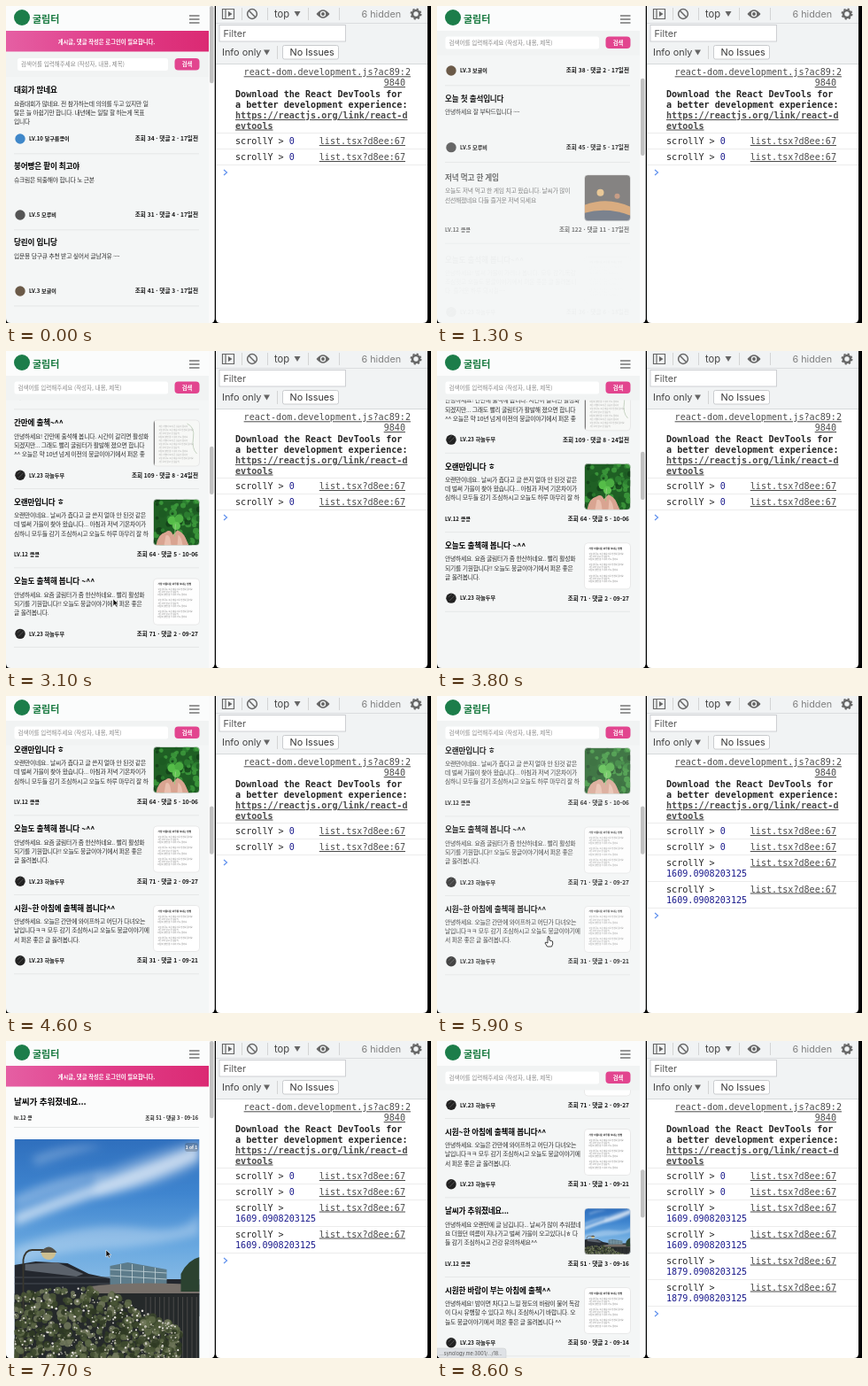
Animation, 480 px wide and 358 px high, one loop 8.9 s. Source, as an HTML page:

```html
<!DOCTYPE html>
<html lang="ko">
<head>
<meta charset="utf-8">
<style>
html, body { margin: 0; width: 100%; height: 100%; overflow: hidden; background: #000; }
svg { display: block; width: 100vw; height: 100vh; }
text { font-family: 'Noto Sans CJK KR', 'Noto Sans CJK JP', 'Noto Sans CJK', sans-serif; white-space: pre; }
.brand { font-size: 11px; font-weight: 900; fill: #17793f; }
.title { font-size: 8.6px; font-weight: 900; fill: #000; letter-spacing: -.02em; }
.head { font-size: 9.6px; font-weight: 900; fill: #000; letter-spacing: -.01em; }
.body { font-size: 6.8px; font-weight: 500; fill: #2a2a2a; letter-spacing: -.035em; }
.lv { font-size: 6.1px; font-weight: 900; fill: #111; }
.stat { font-size: 6.6px; font-weight: 700; fill: #111; text-anchor: end; }
.meta { font-size: 5.7px; font-weight: 700; fill: #222; }
.hint { font-size: 6.5px; fill: #888; }
.white { font-size: 6.3px; font-weight: 700; fill: #fff; text-anchor: middle; }
.ui { font-family: Inter, Roboto, sans-serif; font-size: 11.2px; fill: #444; }
.log { font-family: 'DejaVu Sans Mono', 'Liberation Mono', monospace; font-size: 10.1px; fill: #262626; }
.link { text-decoration: underline; fill: #4c4c4c; }
.num { fill: #1a1a8c; }
.tiny { font-size: 2.3px; fill: #777; }
.status { font-family: Inter, Roboto, sans-serif; font-size: 5.5px; fill: #555; }
</style>
</head>
<body>
<svg id="stage" viewBox="0 0 480 358" preserveAspectRatio="none"></svg>
<script>
const LOOP = 8900, VIEW = 358, FADE = 500;

// Scroll moves: start, duration, from, to
const MOVES = [[550, 750, 0, 335], [1850, 930, 335, 710], [3450, 850, 710, 820], [6250, 850, 820, 957]];
// Visits to a post: opened, back in the list
const VISITS = [[5200, 5530], [7200, 7800]];

const me = ['LV.23 하늘두부', '#222'], bean = ['LV.12 콩콩', ''];
const POSTS = [
  ['대회가 많네요', ['요즘대회가 많네요. 전 참가하는데 의의를 두고 있지만 일', '탈은 늘 아쉽기만 합니다. 내년에는 일탈 할 하는게 목표', '입니다'],
    ['LV.10 달구름콩이', '#3f87c9'], '34 · 댓글 2 · 17일전'],
  ['붕어빵은 팥이 최고야', ['슈크림은 퇴출해야 합니다 노 근본'], ['LV.5 모루비', '#555'], '31 · 댓글 4 · 17일전'],
  ['당린이 입니당', ['입문용 당구큐 추천 받고 싶어서 글남겨유 ~~'], ['LV.3 보글이', '#6b5a48'], '41 · 댓글 3 · 17일전'],
  ['연습 같이 하실 분', ['주말에 같이 연습하실 분 계신가요?'], ['LV.3 보글이', '#6b5a48'], '38 · 댓글 2 · 17일전'],
  ['오늘 첫 출석입니다', ['안녕하세요 잘 부탁드립니다 ~~'], ['LV.5 모루비', '#555'], '45 · 댓글 5 · 17일전'],
  ['저녁 먹고 한 게임', ['오늘도 저녁 먹고 한 게임 치고 왔습니다. 날씨가 많이', '선선해졌네요 다들 즐거운 저녁 되세요'], bean, '122 · 댓글 11 · 17일전', 'night'],
  ['오늘도 출석해 봅니다~^^', ['안녕하세요! 벌써 가을이 가려나 봅니다. 모두 감기,독감', '조심헛고 오늘도 뭉글이야기에서 퍼온 좋은 글 올려봅니', '다. 즐거운 하루 되시길~~'],
    me, '36 · 댓글 6 · 18일전', 'doc'],
  ['테스트용 게시글', ['더보기 기능을 테스트하기 위한 테스트용 게시글 입니다', '☞ (2022-11-20 17:30:30에 수정됨)'], ['LV.9 둥근나루터기', 'none'], '311 · 댓글 33 · 20일전'],
  ['간만에 출첵~^^', ['안녕하세요! 간만에 출석해 봅니다. 시간이 갈리면 활성화', '되겠지만... 그래도 빨리 굴림터가 활발해 졌으면 합니다', '^^ 오늘은 약 10년 넘게 이전의 뭉글이야기에서 퍼온 좋'],
    me, '109 · 댓글 8 · 24일전', 'note'],
  ['오랜만입니다 ㅎ', ['오랜만이네요.. 날씨가 춥다고 글 쓴지 얼마 안 된것 같은', '데 벌써 가을이 찾아 왔습니다... 아침과 저녁 기온차이가', '심하니 모두들 감기 조심하시고 오늘도 하루 마무리 잘 하'],
    bean, '64 · 댓글 5 · 10-06', 'clover'],
  ['오늘도 출첵해 봅니다 ~^^', ['안녕하세요. 요즘 굴림터가 좀 한산하네요.. 빨리 활성화', '되기를 기원합니다!! 오늘도 뭉글이야기에서 퍼온 좋은', '글 올려봅니다.'],
    me, '71 · 댓글 2 · 09-27', 'doc'],
  ['시원~한 아침에 출첵해 봅니다^^', ['안녕하세요. 오늘은 간만에 와이프하고 어딘가 다녀오는', '날입니다ㅋㅋ 모두 감기 조심하시고 오늘도 뭉글이야기에', '서 퍼온 좋은 글 올려봅니다.'],
    me, '31 · 댓글 1 · 09-21', 'doc'],
  ['날씨가 추워졌네요...', ['안녕하세요 오랜만에 글 남깁니다... 날씨가 많이 추워졌네', '요 더웠던 여름이 지나가고 벌써 가을이 오고있다니ㅎ 다', '들 감기 조심하시고 건강 유의하세요^^'],
    bean, '51 · 댓글 3 · 09-16', 'sky'],
  ['시원한 바람이 부는 아침에 출첵^^', ['안녕하세요! 밤이면 차다고 느낄 정도의 바람이 불어 독감', '이 다시 유행할 수 있다고 하니 조심하시기 바랍니다. 오', '늘도 뭉글이야기에서 퍼온 좋은 글 올려봅니다 ^^'],
    me, '50 · 댓글 2 · 09-14', 'doc'],
];

let seed = 7;
const rnd = (a, b) => {
  seed = (seed * 16807) % 2147483647;
  return a + (b - a) * seed / 2147483647;
};
const pick = list => list[rnd(0, list.length) | 0];
const times = (n, fn) => Array.from({ length: n }, (_, i) => fn(i)).join('');
const rect = (x, y, w, h, fill, more = '') => `<rect x="${x}" y="${y}" width="${w}" height="${h}" fill="${fill}" ${more}/>`;
const dot = (x, y, r, fill, more = '') => `<circle cx="${x}" cy="${y}" r="${r}" fill="${fill}" ${more}/>`;
const path = (d, fill, more = '') => `<path d="${d}" fill="${fill}" ${more}/>`;
const stroke = (d, color, w = 1, more = '') => path(d, 'none', `stroke="${color}" stroke-width="${w}" ${more}`);
const text = (cls, x, y, s, more = '') => `<text class="${cls}" x="${x}" y="${y}" ${more}>${s}</text>`;
const group = (id, inner) => `<g id="${id}">${inner}</g>`;
const grad = (id, dir, ...stops) => `<linearGradient id="${id}" ${dir}>` +
  stops.map((c, i) => `<stop offset="${i / (stops.length - 1)}" stop-color="${c}"/>`).join('') + '</linearGradient>';
const DOWN = 'x1="0" y1="0" x2="0" y2="1"';
const PAGE = '#f4f6f6', PAPER = '#fbfcfc';

// Pictures: 52 x 52, the sky is 209 x 247
const lines = ['오늘 하루도 고운 마음으로 천천히 걸어요', '작은 기쁨이 모여 큰 웃음이 됩니다', '바람이 불면 잠시 쉬어 가도 좋아요', '서두르지 말고 한 걸음씩'];
const doc = rect(0, 0, 52, 52, '#fff') +
  text('tiny', 5, 7, '가장 아름다운 하루를 보내는 방법', 'font-weight="700" style="font-size:2.7px;fill:#222"') +
  times(12, i => i % 4 == 3 ? '' : text('tiny', 5, 13 + i * 3.1, lines[(i * 3) % 4]));
const note = rect(0, 0, 52, 52, '#f7f8f6') + rect(0, 0, 1.5, 52, '#777') +
  times(11, i => text('tiny', 6, 8 + i * 4, lines[(i * 3 + 1) % 4], 'fill-opacity=".65"')) +
  stroke('M38 4Q47 8 45 20T49 38', '#b9c9b4', .8);
const clover = rect(0, 0, 52, 52, '#1f5f24') +
  times(70, () => dot(rnd(0, 52), rnd(0, 52), rnd(1.5, 4.5), pick(['#123f18', '#2f8433', '#3f9f3e', '#1c5a22']), 'opacity=".8"')) +
  path('M3 52Q5 39 14 37Q19 33 22 40L27 35Q33 37 36 43L40 52Z', '#d9a491') +
  path('M14 41Q19 38 20 52H12Z M28 40Q32 43 33 52H27Z', '#e9bfae') +
  dot(21, 24, 5, '#55bd48') + dot(29, 22, 5, '#4bad42') + dot(26, 30, 4.5, '#60c552') + stroke('M25 28L24 42', '#95cf80', .9);
const night = rect(0, 0, 52, 52, '#2a2522') + path('M0 34Q26 24 52 36V46H0Z', '#c4701f') +
  path('M0 43Q26 36 52 46V52H0Z', '#182338') + dot(18, 20, 4, '#e0a24a') + dot(37, 24, 3, '#a3552a');
const bushTop = x => 176 - 9 * Math.sin(x / 38) + Math.max(0, x - 110) * .35;
const sky = rect(0, 0, 209, 247, 'url(#air)') +
  `<g fill="#fff" filter="url(#soft)">
  <path d="M0 84Q50 64 100 46T209 6V22Q160 46 110 60T0 98Z" opacity=".6"/>
  <path d="M0 64Q50 40 110 34L80 50Q30 68 0 78Z" opacity=".3"/>
  <path d="M90 40Q150 14 209 0V30Q150 60 90 66Z" opacity=".25"/>
  <path d="M0 122Q80 92 140 100T209 80V108Q150 122 100 124T0 142Z" opacity=".3"/>
  <path d="M20 20Q60 2 100 8Q60 18 24 30Z" opacity=".22"/></g>` +
  path('M0 142L24 138L60 140L84 152L112 158H209V200H0Z', '#23272e') +
  path('M12 141L48 139L78 152L70 155L12 148Z', '#5b626b') + stroke('M0 156H108M0 163H108', '#474c54', 1) +
  path('M108 143L128 139L172 147V164H108Z', '#5d7c8b') + stroke('M108 147L172 151M108 154L172 158M120 141V163M133 141V163M146 143V163M159 145V163', '#c3d3d9', .8) +
  path('M86 166Q130 160 209 164V176H86Z', '#77706a') + path('M0 174H209V247H0Z', '#25292a') +
  path('M188 152Q196 136 209 133V172H188Z', '#2b4230') +
  times(12, i => rect(148 + i * 5.2, 178, 1, 69, '#4a4a49')) +
  stroke('M10 247V136Q12 125 20 125H36', '#39372f', 1.8) + path('M30 128Q39 121 47 128Q45 136 39 136Q32 136 30 128Z', '#cdbf91') + path('M29 128Q39 115 48 128Z', '#54524a') +
  times(620, () => {
    const x = rnd(-2, 188);
    return dot(x, rnd(bushTop(x), 249), rnd(1.5, 4.5), pick(['#2f3a24', '#4a5637', '#5f6a48', '#3b472c', '#727a5c']), 'opacity=".85"');
  }) +
  times(330, () => {
    const x = rnd(0, 186);
    return dot(x, rnd(bushTop(x), 247), rnd(.5, 1.3), pick(['#e4e1dc', '#c9c7bd', '#a9a896']));
  });

// Rows of the list
let top0 = 81;
const rows = POSTS.map(([title, body, [lv, face], stat, pic]) => {
  const h = pic ? 89.5 : 86, ty = pic ? 15 : 14, ly = pic ? 74.3 : 69, top = top0;
  top0 += h;
  const inner = text('title', 9, ty + 3.2, title) +
    body.map((s, n) => text('body', 9, ty + 17.6 + n * 10.2, s)).join('') +
    (face ? dot(16, ly, 5.7, face, face == 'none' ? 'stroke="#777" stroke-width="1"' : '') : '') +
    (face == '#222' ? stroke('M13 73L17 69M14 77L20 71', '#666', .7, `transform="translate(0 ${ly - 74})"`) : '') +
    text('lv', face ? 26 : 9, ly + 2.3, lv) + text('stat', 217, ly + 2.4, '조회 ' + stat) +
    (pic ? `<g transform="translate(166.5 12)" clip-path="url(#thumb)"><use href="#${pic}" ${pic == 'sky' ? 'transform="scale(.25)"' : ''}/></g>` +
      rect(166.5, 12, 52, 52, 'none', 'rx="4" stroke="#ddd" stroke-width=".6"') : '') +
    rect(9, h - .5, 209, .8, '#e1e4e4');
  return { top, bottom: top + h, html: group('row' + POSTS.findIndex(p => p[0] == title), inner) };
});

const banner = rect(0, 27.5, 229, 24, 'url(#pink)') + text('white', 113.5, 42.8, '게시글, 댓글 작성은 로그인이 필요합니다.');
const header = rect(0, 0, 229, 28, PAPER) + dot(18, 13, 9, '#1c7d4a') + text('brand', 30, 19, '굴림터') +
  stroke('M207 11H218.5M207 15H218.5M207 19H218.5', '#333', 1.2);
const search = rect(0, 0, 229, 27.5, '#f1f3f3') + `<rect id="field" y="6.5" height="14" rx="2.5" fill="#fff"/>` +
  `<text id="hint" class="hint" y="15.8">검색어를 입력해주세요 (작성자, 내용, 제목)</text>` +
  rect(190.5, 6.5, 28, 13.5, '#e2458f', 'rx="4"') + text('white', 204.5, 15.6, '검색');

const post = (id, title, lv, stat, pic) => group(id, rect(0, 0, 229, VIEW, PAPER) + banner +
  text('head', 9, 72, title) + text('meta', 9, 89.3, lv) + text('meta', 217, 89.3, '조회 ' + stat, 'text-anchor="end"') +
  rect(9, 97, 209, .8, '#e1e4e4') + group(id + 'Pic', pic + rect(202, 115, 15, 10, '#333', 'rx="3" opacity=".25"') +
  text('white', 209.5, 122, '1 of 1', 'style="font-size:5px"')));

// Console
const X0 = 237, X1 = 476, W = X1 - X0;
const rule = y => rect(X0, y - .8, W, .8, '#e8e8e8');
const src = (y, s = 'list.tsx?d8ee:67', x = 451) => text('log link', x, y, s, 'text-anchor="end"');
const bold = (y, s, cls = '') => text('log ' + cls, 259, y, s, 'font-weight="700"');
const short = y => text('log', 259, y + 12, 'scrollY &gt; <tspan class="num">0</tspan>') + src(y + 12) + rule(y + 18);
const long = (y, n) => text('log', 259, y + 11.5, 'scrollY &gt;') + text('log num', 259, y + 23.5, n) + src(y + 11.5) + rule(y + 30);
const tools = rect(X0, 0, W, 65.5, '#f1f3f4') + rect(X0, 19, W, .8, '#d5d8da') + rect(X0, 65, W, .8, '#cfd2d4') +
  stroke('M244.5 3.5H257.5V14.5H244.5ZM248 3.5V14.5', '#666', 1.2) + path('M251 6L255.500 9L251 12Z', '#666') +
  dot(278, 9, 5.4, 'none', 'stroke="#666" stroke-width="1.5"') + stroke('M274.300 5.300L281.700 12.700', '#666', 1.5) +
  stroke('M266.500 2V16M295.500 2V16M341.500 2V16M376.500 2V16', '#ccc', .8) +
  text('ui', 303, 13, 'top') + path('M325.500 6H332.500L329 12Z', '#666') +
  path('M350.500 9Q358 -.5 365.500 9Q358 18.500 350.500 9Z', '#666') + dot(358, 9, 3.2, '#f1f3f4') + dot(358, 9, 1.9, '#666') +
  text('ui', 401.5, 13, '6 hidden', 'style="font-size:10.8px;fill:#808080"') +
  dot(463, 9, 4, 'none', 'stroke="#666" stroke-width="2.6"') + dot(463, 9, 5.7, 'none', 'stroke="#666" stroke-width="1.6" stroke-dasharray="2.2 2.28"') +
  rect(241, 21.5, 142.5, 18.5, '#fff', 'stroke="#c8cbce" stroke-width=".9"') + text('ui', 245.5, 34.8, 'Filter', 'style="font-size:10.8px;fill:#555"') +
  text('ui', 244, 56, 'Info only', 'style="font-size:10.9px"') + path('M291 49.500H298L294.500 55.500Z', '#666') + stroke('M306.500 45V60', '#ccc', .8) +
  rect(312.5, 44.5, 63, 15.5, '#fff', 'rx="2" stroke="#c4c7ca" stroke-width=".9"') + text('ui', 320.5, 56.2, 'No Issues', 'style="font-size:10.8px;fill:#333"');
const logs = src(78.3, 'react-dom.development.js?ac89:2', 457) + src(90, '9840') +
  bold(102.5, 'Download the React DevTools for') + bold(114.5, 'a better development experience:') +
  bold(127, 'https://reactjs.org/link/react-d', 'link') + bold(138.5, 'evtools', 'link') + rule(144) + short(144) + short(162) +
  group('logA', long(180, '1609.0908203125') + long(210, '1609.0908203125')) +
  group('logB', long(240, '1879.0908203125') + long(270, '1879.0908203125')) +
  group('prompt', stroke('M246 -3L249.500 0L246 3', '#5f90ee', 1.2));

const arrow = path('M0 0V8L2 6.200L3.300 9L4.600 8.400L3.300 5.700H6Z', '#111', 'stroke="#fff" stroke-width=".6"');
const hand = path('M-1 -5Q0 -6 1 -5V-1L4.500 0Q5.500 3 3.500 6H-1.500L-4 2Q-4 0 -1 2Z', '#fff', 'stroke="#111" stroke-width=".8"');

// Window with rounded bottom corners
const pane = (id, a, b) => `<clipPath id="${id}"><path d="M${a} 0H${b}V353Q${b} 358 ${b - 5} 358H${a + 5}Q${a} 358 ${a} 353Z"/></clipPath>`;

const stage = document.getElementById('stage');
stage.innerHTML = `<defs>
  ${grad('pink', 'x1="0" x2="1"', '#e55fa3', '#e03d89', '#db2a73')}
  ${grad('air', DOWN, '#2f6fbd', '#3f85cf', '#6aa9e0', '#98c4e8', '#8fb5d0')}
  <filter id="soft"><feGaussianBlur stdDeviation="5"/></filter>
  <clipPath id="thumb"><rect width="52" height="52" rx="4"/></clipPath>
  <clipPath id="photo"><rect width="209" height="247"/></clipPath>
  ${pane('left', 0, 235.5)}${pane('right', X0, X1)}
  ${group('doc', doc)}${group('note', note)}${group('clover', clover)}${group('night', night)}
  <g id="sky" clip-path="url(#photo)">${sky}</g>
</defs>
<rect width="480" height="358"/>
<g clip-path="url(#left)">
  ${rect(0, 0, 236, VIEW, PAGE)}
  ${group('list', group('banner', banner) + rows.map(r => r.html).join('') + group('search', search))}
  ${post('postA', POSTS[11][0], 'lv.23 하늘두부', POSTS[11][3], '<use href="#doc" transform="translate(9 111) scale(4.02)"/>')}
  ${post('postB', POSTS[12][0], 'lv.12 콩', POSTS[12][3], '<use href="#sky" transform="translate(9.5 111)"/>')}
  ${header}
  ${rect(229, 0, 7, VIEW, '#fafafa')}<rect id="thumbBar" x="230" width="4.5" rx="2.2" fill="#c1c1c1"/>
  ${group('status', path('M0 347H75Q78 347 78 350V358H0Z', '#dfe2e6', 'stroke="#c5c8cb" stroke-width=".5"') + text('status', 3, 354.5, '...synology.me:3001/.../18...'))}
  ${group('arrow', arrow)}${group('hand', hand)}
</g>
<g clip-path="url(#right)">${rect(X0, 0, W, VIEW, '#fff')}${tools}${logs}</g>`;

const el = {};
stage.querySelectorAll('[id]').forEach(n => el[n.id] = n);
const show = (id, on) => el[id].style.display = on ? '' : 'none';
const move = (id, x, y) => el[id].setAttribute('transform', `translate(${x} ${y})`);
const set = (id, attrs) => { for (const k in attrs) el[id].setAttribute(k, attrs[k]); };
const clamp = v => Math.min(1, Math.max(0, v));
const within = (t, a, b) => t >= a && t < b;

function scrollAt(t) {
  let y = 0;
  for (const [start, dur, from, to] of MOVES)
    if (t >= start) y = from + (to - from) * (1 - Math.cos(Math.PI * clamp((t - start) / dur))) / 2;
  return y;
}

// Moment at which a row is fully inside the view
function reach(bottom) {
  const need = bottom - VIEW;
  if (need <= 0) return -FADE;
  const m = MOVES.find(m => need <= m[3]);
  return m ? m[0] + m[1] * Math.acos(1 - 2 * (need - m[2]) / (m[3] - m[2])) / Math.PI : Infinity;
}
rows.forEach(r => r.seen = reach(r.bottom));

function draw(t) {
  const y = scrollAt(t), [a, b] = VISITS;
  const inA = within(t, ...a), inB = within(t, ...b), open = inA || inB;
  const back = t >= b[1] ? b[1] : t >= a[1] ? a[1] : -FADE;

  show('list', !open);
  show('postA', inA);
  show('postB', inB);
  el.postAPic.style.opacity = clamp((t - a[0]) / 200);
  el.postBPic.style.opacity = clamp((t - b[0]) / 200);

  move('banner', 0, -y);
  rows.forEach((r, i) => {
    const p = clamp((t - Math.max(r.seen, back)) / FADE), o = p * p * (3 - 2 * p);
    move('row' + i, 0, r.top - y + 6 * (1 - o));
    el['row' + i].style.opacity = o;
  });
  const stuck = y >= 24.5, left = stuck ? 9.5 : 13;
  move('search', 0, Math.max(52.5 - y, 28));
  set('field', { x: left, width: 183 - left });
  set('hint', { x: left + 4 });

  const total = t < 2650 || open ? 1469 : 2360;
  set('thumbBar', { y: open ? 0 : y / total * VIEW, height: VIEW * VIEW / total });

  show('logA', t >= a[1]);
  show('logB', t >= b[1]);
  move('prompt', 0, t >= b[1] ? 308 : t >= a[1] ? 248 : 188);
  show('status', within(t, 4900, a[0]) || t >= 8200);
  show('arrow', within(t, 2700, 3500) || inB);
  move('arrow', inB ? 113 : 121, inB ? 236 : 280);
  show('hand', within(t, a[0], 6300));
  move('hand', 126, 277);
}

const began = performance.now();
(function tick() {
  draw((performance.now() - began) % LOOP);
  requestAnimationFrame(tick);
})();
</script>
</body>
</html>
```
